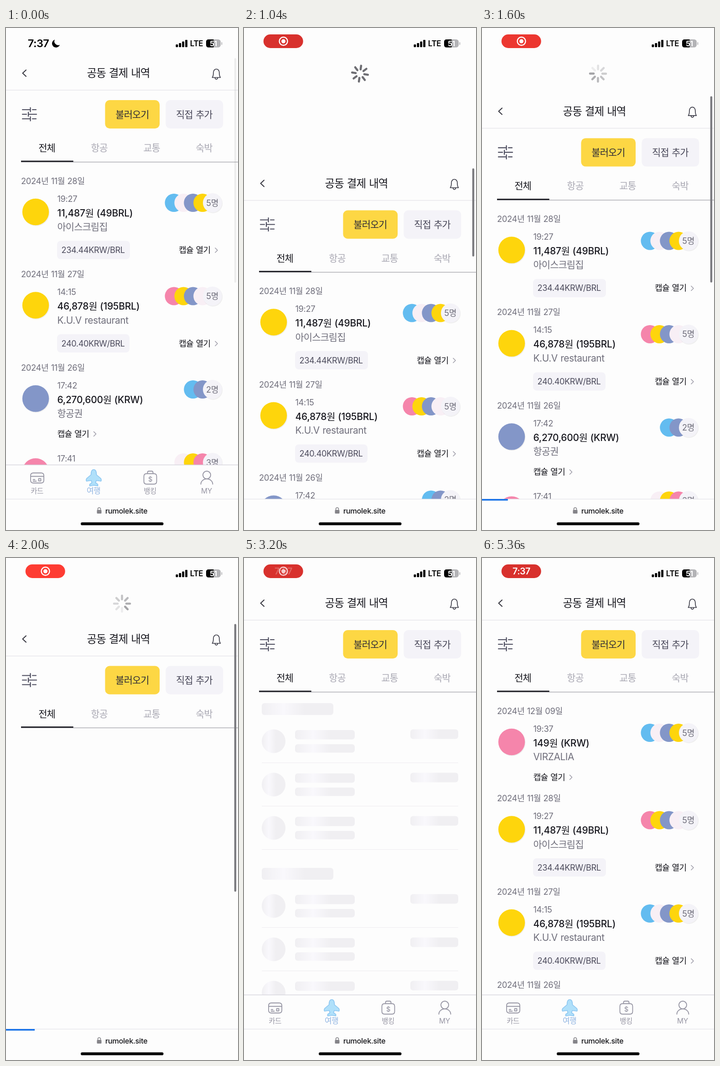
These frames come from a looping animation (509 px wide and 1100 px high, 5.44 s). An HTML page:

```html
<!DOCTYPE html>
<html lang="ko">
<head>
<meta charset="utf-8">
<title>공동 결제 내역</title>
<style>
html, body { margin: 0; width: 100%; height: 100%; overflow: hidden; background: #fdfdfd; }
svg { display: block; width: 100vw; height: 100vh; }
text { font-family: Inter, 'Noto Sans CJK KR', 'Noto Sans CJK JP', sans-serif; letter-spacing: -.02em; word-spacing: .05em; white-space: pre; }
.ko { letter-spacing: -.042em; }
.amount text { letter-spacing: -.01em; }
.line { fill: none; stroke-linecap: round; stroke-linejoin: round; }
</style>
</head>
<body>
<svg id="stage" viewBox="0 0 509 1100"></svg>
<script>
const LOOP = 5440, STEP = 80;
const BG = '#fdfdfd', INK = '#17171e', GREY = '#6f6e7b', PALE = '#f4f3f8';
const SKY = '#63bcf0', WHITE = '#f8eff5', BLUE = '#8396c8', YELLOW = '#fed50c', PINK = '#f585ab';

// ---- drawing helpers ----
const rect = (x, y, w, h, r, fill, more = '') =>
  `<rect x="${x}" y="${y}" width="${w}" height="${h}" rx="${r}" fill="${fill}" ${more}/>`;
const disc = (x, y, r, fill, more = '') => `<circle cx="${x}" cy="${y}" r="${r}" fill="${fill}" ${more}/>`;
const path = (d, color, width) => `<path class="line" d="${d}" stroke="${color}" stroke-width="${width}"/>`;
const group = (id, body, more = '') => `<g id="${id}" ${more}>${body}</g>`;

// y is the optical middle of the line; Hangul runs are set a little tighter
function text(x, y, size, str, fill, weight = 400, anchor = 'start') {
  const runs = str.match(/[가-힣]+|[^가-힣]+/g)
    .map(s => /[가-힣]/.test(s) ? `<tspan class="ko">${s}</tspan>` : s).join('');
  return `<text x="${x}" y="${y + size * .36}" font-size="${size}" fill="${fill}" font-weight="${weight}" text-anchor="${anchor}">${runs}</text>`;
}

const shadowed = (x, y, r, fill) => disc(x + 1, y + 1.4, r + .3, '#000', 'opacity=".06"') + disc(x, y, r, fill);

function stack(y, colors, count) {
  const first = 431.2 - 20.9 * (colors.length - 1);
  return colors.map((c, i) => disc(first + i * 20.9, y, 20, c)).join('') +
    shadowed(453, y, 21, PALE) + text(452.5, y, 18.3, count + '명', GREY, 400, 'middle');
}

const capsule = (x, y) => text(x, y, 18.3, '캡슐 열기', INK, 500) +
  path(`M${x + 80} ${y - 4.5}l5 5l-5 5`, '#9a99a5', 1.5);

function payment(y, p) {
  let out = shadowed(65, y + 29, 29.2, p.color) +
    text(112.5, y, 18.3, p.time, GREY) +
    `<g class="amount">${text(112.5, y + 31, 20.9, p.amount, INK, 500)}</g>` +
    text(112.5, y + 61.5, 20.9, p.place, GREY) +
    stack(y + 9, p.people, p.count);
  if (p.rate) {
    out += rect(112, y + 92.5, p.rateWidth, 40, 8, PALE) +
      text(121.5, y + 112.5, 18.1, p.rate, '#4c4b5c') + capsule(379, y + 112.5);
  } else out += capsule(112.5, y + 106);
  return out;
}

function paymentList(items) {
  let y = 335, out = '';
  for (const p of items) {
    if (p.date) out += text(33, y, 18.3, `2024년 ${p.date}`, GREY);
    else y -= 31.5;
    out += payment(y + 39, p);
    y += p.rate ? 204.5 : 191.5;
  }
  return out;
}

// ---- content ----
const MIX_A = [SKY, WHITE, BLUE, YELLOW], MIX_B = [PINK, YELLOW, BLUE, WHITE];
const dessert = { date: '11월 28일', time: '19:27', amount: '11,487원 (49BRL)', place: '아이스크림집',
  color: YELLOW, rate: '234.44KRW/BRL', rateWidth: 160, count: 5 };
const dinner = { date: '11월 27일', time: '14:15', amount: '46,878원 (195BRL)', place: 'K.U.V restaurant',
  color: YELLOW, rate: '240.40KRW/BRL', rateWidth: 159, count: 5 };
const flight = { date: '11월 26일', time: '17:42', amount: '6,270,600원 (KRW)', place: '항공권',
  color: BLUE, people: [SKY, BLUE], count: 2 };
const extra = { time: '17:41', amount: '84,200원 (KRW)', place: '교통권',
  color: PINK, people: [WHITE, YELLOW, PINK], count: 3 };
const snack = { date: '12월 09일', time: '19:37', amount: '149원 (KRW)', place: 'VIRZALIA',
  color: PINK, people: MIX_A, count: 5 };

const oldList = paymentList([{ ...dessert, people: MIX_A }, { ...dinner, people: MIX_B }, flight, extra]);
const newList = paymentList([snack, { ...dessert, people: MIX_B }, { ...dinner, people: MIX_A }, flight]);

function skeleton() {
  const bar = (x, y, w, h) => rect(x, y, w, h, 6, 'url(#shimmer)');
  let out = '';
  for (const top of [318, 679]) {
    out += bar(39, top, 157, 26);
    for (let i = 0; i < 3; i++) {
      const y = top + 58 + i * 95;
      out += disc(65, y + 25.5, 26, 'url(#shimmer)') + bar(112, y + 1, 131, 20.5) +
        bar(112, y + 32, 131, 18.5) + bar(365, y - .5, 105, 21) + rect(39, y + 72, 431, 1.3, 0, '#f0eff2');
    }
  }
  return out;
}

function header() {
  const tabs = ['전체', '항공', '교통', '숙박'].map((s, i) =>
    text(89.5 + i * 115, 262.5, 20.9, s, i ? '#a9a8b3' : INK, i ? 400 : 500, 'middle')).join('');
  return path('M44 92l-7.5 7l7.5 7', '#33333d', 2) +
    text(246.5, 99, 23.5, '공동 결제 내역', INK, 500, 'middle') +
    path('M452.5 108.5h18c-2-2.5-2.5-4-2.5-10.5c0-5-3-8-6.5-8s-6.5 3-6.5 8c0 6.5-.5 8-2.5 10.5zM458.5 109c.5 4.500 5.500 4.500 6 0', '#3c3c48', 1.7) +
    rect(0, 135.5, 509, 1.4, 0, '#e6e5ea') +
    path('M36 179h16M58 179h8M53.5 174.5v9M36 189h9M49 189h18M49 184.5v9M36 199h16M58 199h8M53.5 194.5v9', '#4a4a5c', 2.2) +
    rect(217.4, 158, 119.7, 62.2, 10, '#fdd744') + text(277, 189, 20.9, '불러오기', '#2e2c36', 400, 'middle') +
    rect(350.4, 158, 126, 62.2, 10, PALE) + text(413, 189, 20.9, '직접 추가', '#4a495a', 400, 'middle') +
    tabs + rect(33, 293, 476, 1.4, 0, '#a9a9af') + rect(33, 290.7, 114.7, 2.7, 0, INK);
}

function navBar() {
  const tone = '#9695a3';
  const label = (x, s, size = 15.6, fill = tone) => text(x, 1014, size, s, fill, 400, 'middle');
  return rect(0, 957, 509, 300, 0, BG) + rect(0, 956.7, 509, 1.4, 0, '#d6d5dc') +
    path('M60 975h17q6 0 6 6v10q0 6-6 6h-17q-6 0-6-6v-10q0-6 6-6zM54.5 982.5h28M59.5 989.5h4M59.5 993h7M71.5 987.5h5v5h-5z', tone, 1.8) +
    `<path d="M192.5 967.5C196.500 967.500 198.500 972 198.500 979L207.500 986.500Q210 989.500 208.500 993L198 991.500L196.500 996.500L201.500 1000V1003.500L192.500 1002L183.500 1003.500V1000L188.500 996.500L187 991.500L176.500 993Q175 989.500 177.500 986.500L186.500 979C186.500 972 188.500 967.500 192.500 967.500Z" fill="#b0e0fa" stroke="#8cc6f1" stroke-width="1.6" stroke-linejoin="round"/>` +
    path('M308.5 976.5h16q6 0 6 6v11q0 6-6 6h-16q-6 0-6-6v-11q0-6 6-6zM310.5 976v-2q0-3 3-3h6q3 0 3 3v2', tone, 1.8) +
    text(316.5, 988.5, 14.5, '$', tone, 500, 'middle') +
    path('M432 979.5a8.500 8.500 0 1 0 17 0a8.500 8.500 0 1 0-17 0M427.500 999.500a13 11.500 0 0 1 26 0', tone, 1.9) +
    label(68, '카드') + label(192, '여행', 17, '#8fb4e2') + label(316, '뱅킹') + label(440, 'MY');
}

function statusBar() {
  const bars = [6, 9, 12.5, 16].map((h, i) => rect(372.5 + i * 6.9, 42 - h, 4.8, h, 1.3, '#000')).join('');
  const clock = text(71, 34, 23.4, '7:37', '#000', 600, 'middle') +
    '<path d="M107 25.5A8.8 8.8 0 1 0 118 37A8.5 8.5 0 0 1 107 25.5Z" fill="#000"/>';
  const record = disc(86.5, 29, 9, 'none', 'stroke="#fff" stroke-width="2.4"') + disc(86.5, 29, 4.5, '#fff');
  return group('clock', clock) +
    group('pill', rect(42.7, 14, 87, 30, 15, '#f00', 'id="pillFill"') + group('record', record) +
      group('pillTime', text(86.5, 29, 19.6, '7:37', '#fff', 600, 'middle'))) +
    bars + text(418, 34, 17, 'LTE', '#000', 600, 'middle') +
    rect(439, 25, 32, 17.5, 5.5, '#b3b3b6') + '<path d="M455.5 25h-11q-5.5 0-5.5 5.5v6.5q0 5.5 5.5 5.5h11z" fill="#000"/>' +
    rect(472.5, 31, 1.8, 6, .9, '#b3b3b6') + text(455, 34, 15.5, '51', '#fff', 700, 'middle');
}

function toolbar() {
  return rect(0, 1032, 509, 68, 0, BG) + rect(0, 1031.7, 509, 1.2, 0, '#e3e3e8') +
    rect(0, 1032, 0, 3.6, 0, '#1a73e8', 'id="progress"') +
    rect(199.5, 1056, 10, 8, 1.5, '#858489') + path('M201.5 1056v-2a3 3 0 0 1 6 0v2', '#858489', 1.6) +
    text(264, 1058, 16.4, 'rumolek.site', '#16161a', 500, 'middle') +
    rect(164, 1083.3, 181.5, 6.2, 3.1, '#000');
}

const spokes = Array.from({ length: 8 }, (_, i) =>
  `<path class="spoke line" d="M0-9.5V-17.5" stroke="#6e6e73" stroke-width="4.6" transform="rotate(${i * 45})"/>`).join('');

document.getElementById('stage').innerHTML =
  `<defs><linearGradient id="shimmer"><stop offset="0" stop-color="#f0eff2"/><stop offset=".5" stop-color="#f9f8fc"/><stop offset="1" stop-color="#f0eff2"/></linearGradient></defs>` +
  rect(0, 0, 509, 1100, 0, BG) + group('spinner', spokes) +
  group('page', rect(0, 62, 509, 1100, 0, BG) + header() +
    group('oldList', oldList) + group('bones', skeleton()) + group('newList', newList) + navBar()) +
  rect(500.8, 66, 4.4, 492, 2.2, '#7b7b7f', 'id="scroll"') + toolbar() + statusBar();

// ---- motion ----
const el = id => document.getElementById(id);
const set = (id, name, value) => el(id).setAttribute(name, value);
const show = (id, on) => set(id, 'display', on ? 'inline' : 'none');
const ramp = (t, a, b) => Math.min(1, Math.max(0, (t - a) / (b - a)));
const smooth = p => (1 - Math.cos(Math.PI * p)) / 2;
const spokeEls = [...document.querySelectorAll('.spoke')];

const PULL = 241.5, REST = 78.5;
const T = { pull: 560, top: 1020, release: 1120, rest: 1660, blank: 1840, bones: 2160, home: 2600, data: 3680 };

function offsetAt(t) {
  if (t < T.release) return PULL * smooth(ramp(t, T.pull, T.top));
  if (t < T.bones) return PULL + (REST - PULL) * smooth(ramp(t, T.release, T.rest));
  return REST * (1 - smooth(ramp(t, T.bones, T.home)));
}

function drawSpinner(t, offset) {
  const head = Math.floor((t - 1360) / 91 + 32) + 4;
  const fade = 1 - ramp(t, T.bones, 2400);
  const turn = 8 * ramp(offset, REST, 165);
  set('spinner', 'transform', `translate(254.5 100) rotate(${turn})`);
  spokeEls.forEach((spoke, i) => {
    const age = (((head - i) % 8) + 8) % 8;
    const alpha = t < T.release ? ramp(offset / 24 - i, 0, 1) : (.62 - age * .072) * fade;
    spoke.setAttribute('opacity', alpha);
  });
}

function drawScroll(t, offset) {
  const empty = t >= T.blank && t < T.data;
  const length = (empty ? 665 : 492) - .88 * offset - .00148 * offset * offset;
  set('scroll', 'y', 66 + offset);
  set('scroll', 'height', length);
  set('scroll', 'opacity', t < T.pull ? .12 * (1 - ramp(t, 0, 240)) : ramp(t, T.pull, 720) * (1 - ramp(t, 2480, 2760)));
}

function drawPill(t) {
  const glow = (1 - Math.cos((t - 1060) / 2120 * 2 * Math.PI)) / 2;
  const mix = (a, b) => Math.round(a + (b - a) * glow);
  set('pillFill', 'fill', `rgb(${mix(216, 255)},${mix(49, 60)},${mix(45, 51)})`);
  const shown = ramp(t, 160, 400), swap = ramp(t, 3120, 3440);
  set('clock', 'opacity', 1 - shown);
  set('pill', 'opacity', shown);
  set('record', 'opacity', 1 - swap);
  set('pillTime', 'opacity', swap);
}

function draw(t) {
  const offset = offsetAt(t);
  set('page', 'transform', `translate(0 ${offset})`);
  show('oldList', t < T.blank);
  show('bones', t >= T.bones && t < T.data);
  show('newList', t >= T.data);
  drawSpinner(t, offset);
  drawScroll(t, offset);
  drawPill(t);
  const loaded = 53 * smooth(ramp(t, 1120, 1360)) + 10 * ramp(t, 1360, 2000) + 446 * smooth(ramp(t, T.bones, 2400));
  set('progress', 'width', loaded);
  set('progress', 'opacity', 1 - ramp(t, 2400, 2640));
  const peak = (((t - 3200) / 1000 + 5.4) % 1.6) - .3;
  set('shimmer', 'gradientTransform', `translate(${peak - .3} 0) scale(.6 1)`);
}

let start;
function frame(now) {
  start ??= now;
  draw(Math.floor(((now - start) % LOOP) / STEP) * STEP);
  requestAnimationFrame(frame);
}
draw(0);
requestAnimationFrame(frame);
</script>
</body>
</html>
```
